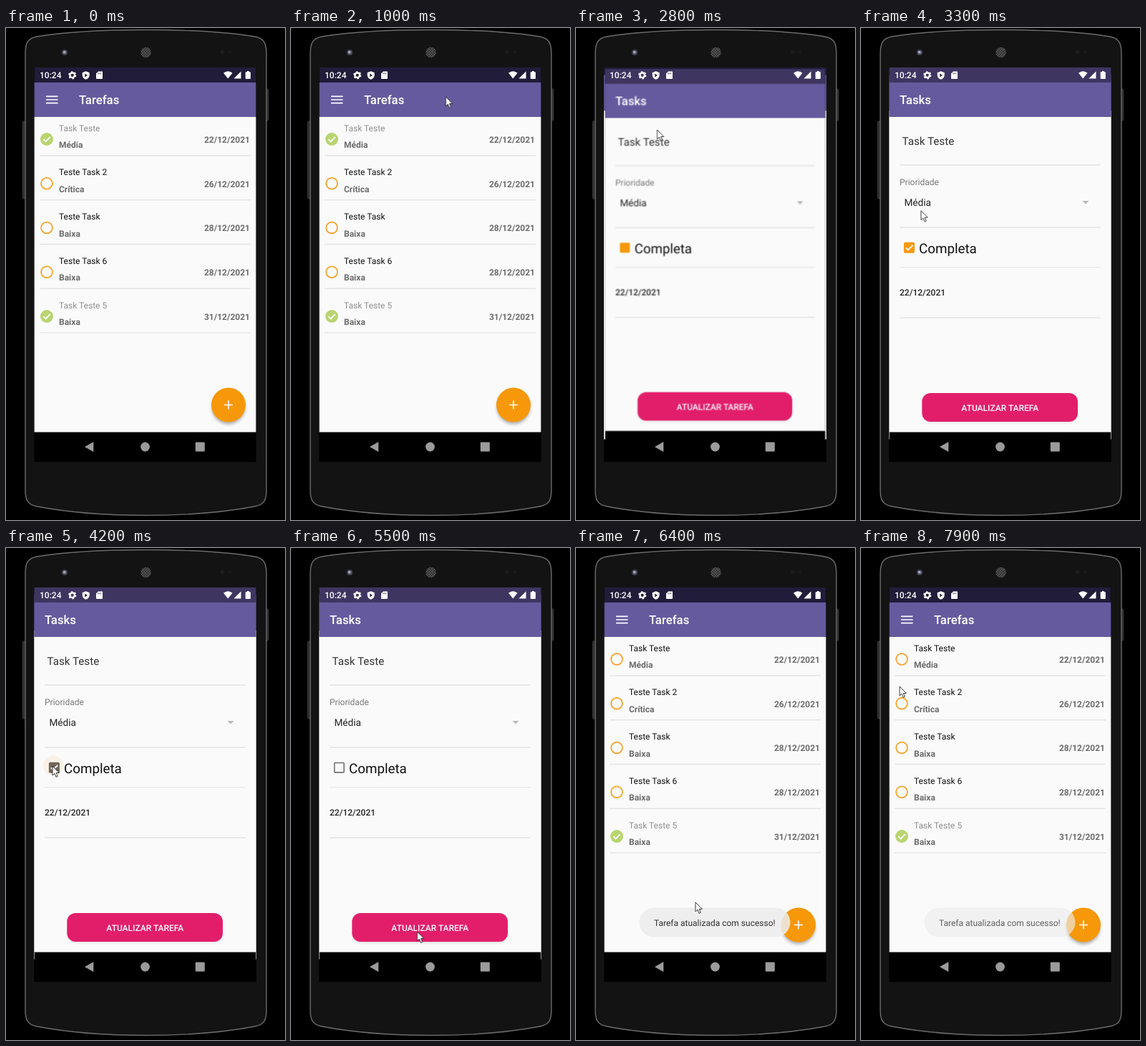
Animation of 390 by 686 pixels, one loop 8 s. Source, as an HTML page:

```html
<!DOCTYPE html>
<html lang="pt">
<head>
<meta charset="utf-8">
<title>Tarefas</title>
<style>
  html, body { margin: 0; width: 100%; height: 100%; overflow: hidden; background: #000; }
  svg { display: block; width: 390px; height: 686px; font: 12px Roboto, Arial, sans-serif; text-rendering: geometricPrecision; }
  .medium { font-weight: 500; }
  .bold { font-weight: 700; }
  .title { font-size: 16.8px; font-weight: 500; fill: #fff; }
  .line { stroke: #e4e4e4; stroke-width: 1.7; }

  .anim { animation: 8s step-end -30ms infinite; }
  #list, #task { transform-origin: 194.5px 330px; }
  #list { animation-name: list; }
  #task { animation-name: task; }
  #before { animation-name: before; }
  #after { animation-name: after; }
  #box { animation-name: box; }
  #tick { animation-name: tick; }
  #ripple { animation-name: ripple; }
  #press { animation-name: press; }
  #toast { animation-name: toast; }
  #cursor { animation-name: cursor; }

  @keyframes list {
    0% { transform: none; }
    33.75% { transform: scale(1.02); }
    35% { transform: scale(1.043); }
    72.5% { transform: scale(1.06); }
    73.75% { transform: scale(1.02); }
    75%, 100% { transform: none; }
  }
  @keyframes task {
    0% { opacity: 0; transform: scale(.94); }
    33.75% { opacity: .6; transform: scale(.96); }
    35% { opacity: 1; transform: scale(.993); }
    36.25% { opacity: 1; transform: none; }
    73.75% { opacity: .5; transform: scale(.95); }
    75%, 100% { opacity: 0; transform: scale(.9); }
  }
  @keyframes before { 0% { opacity: 1; } 62.5%, 100% { opacity: 0; } }
  @keyframes after { 0% { opacity: 0; } 62.5%, 100% { opacity: 1; } }
  @keyframes box {
    0% { fill: #f7980a; stroke: #f7980a; stroke-width: .5; }
    36.25% { fill: #f7980a; stroke: #f7980a; stroke-width: 1.6; }
    52.5% { fill: #716659; stroke: #716659; stroke-width: 1.6; }
    53.75%, 100% { fill: #fafafa; stroke: #707070; stroke-width: 1.6; }
  }
  @keyframes tick { 0% { opacity: 0; } 36.25% { opacity: 1; } 53.75%, 100% { opacity: 0; } }
  @keyframes ripple {
    0% { opacity: 0; }
    47.5% { opacity: .06; }
    48.75% { opacity: .1; }
    50% { opacity: .13; }
    52.5% { opacity: .08; }
    53.75% { opacity: .04; }
    55%, 100% { opacity: 0; }
  }
  @keyframes press { 0% { opacity: .1; } 67.5% { opacity: .16; } 75%, 100% { opacity: .1; } }
  @keyframes toast {
    0% { opacity: 0; }
    76.25% { opacity: .2; }
    77.5% { opacity: .45; }
    78.75% { opacity: .7; }
    80% { opacity: .86; }
    97.5% { opacity: .78; }
    98.75%, 100% { opacity: .66; }
  }
  @keyframes cursor {
    0% { opacity: 0; transform: translate(400px, 70px); }
    1.25% { opacity: 1; transform: translate(357px, 60px); animation-timing-function: steps(3); }
    5% { transform: translate(323px, 17px); }
    6.25% { transform: translate(323px, 17px); animation-timing-function: steps(9); }
    17.5% { transform: translate(131px, 159px); animation-timing-function: steps(3); }
    21.25% { transform: translate(118px, 135px); animation-timing-function: steps(3); }
    25% { transform: translate(113.5px, 142px); }
    36.25% { transform: translate(113.5px, 142px); animation-timing-function: steps(6); }
    43.75% { transform: translate(69px, 311px); }
    45% { transform: translate(65px, 304px); }
    53.75% { transform: translate(65px, 304px); animation-timing-function: steps(3); }
    57.5% { transform: translate(135px, 445px); animation-timing-function: steps(4); }
    62.5% { transform: translate(176.5px, 535px); }
    75% { transform: translate(176.5px, 535px); animation-timing-function: steps(4); }
    80% { transform: translate(167px, 494px); animation-timing-function: steps(2); }
    82.5% { transform: translate(160px, 470px); animation-timing-function: steps(9); }
    93.75% { transform: translate(53px, 150px); }
    96.25% { transform: translate(53px, 150px); animation-timing-function: steps(2); }
    98.75%, 100% { opacity: 1; transform: translate(54px, 193px); }
  }
</style>
</head>
<body>
<svg viewBox="0 0 390 686">
  <defs>
    <clipPath id="screen"><rect x="39.6" y="55" width="309.8" height="550"/></clipPath>
    <pattern id="mesh" width="2.6" height="2.6" patternUnits="userSpaceOnUse" patternTransform="rotate(45)">
      <rect width="2.6" height="2.6" fill="#262626"/><circle cx="1.3" cy="1.3" r=".8" fill="#808080"/>
    </pattern>
    <filter id="soft" x="-30%" y="-30%" width="160%" height="160%"><feGaussianBlur stdDeviation="2"/></filter>
    <path id="check" d="M-4.6 .2L-1.5 3.3L4.8 -3.2" fill="none" stroke="#fff" stroke-width="1.9"/>
    <g id="window">
      <rect x="39.6" y="55" width="309.8" height="550"/>
      <rect x="39.6" y="124" width="309.8" height="439.5" fill="#fafafa"/>
      <rect x="39.6" y="76" width="309.8" height="48" fill="#655a9e"/>
    </g>
  </defs>

  <!-- Phone -->
  <g>
    <rect width="390" height="686"/>
    <rect x="23.5" y="130" width="5" height="108" rx="1.5" fill="#2a2a2a" stroke="#505050" stroke-width=".8"/>
    <rect x="362" y="85" width="4.7" height="44" rx="1.5" fill="#2a2a2a" stroke="#505050" stroke-width=".8"/>
    <path d="M27 36C27 20 31 14.5 43 12C90 4.5 140 2.5 195.5 2.5S301 4.5 348 12C360 14.5 364 20 364 36V645C364 659 360 664.5 348 667C301 676 251 679.5 195.5 679.5S90 676 43 667C31 664.5 27 659 27 645Z" fill="#131313" stroke="#6c6c6c" stroke-width="1.4"/>
    <circle cx="82" cy="34" r="4.6" fill="#303138"/>
    <circle cx="82" cy="34" r="2.8" fill="#6a6c84"/>
    <circle cx="81.5" cy="33.5" r="1.4" fill="#b4b6c6"/>
    <circle cx="195.5" cy="34" r="7.3" fill="url(#mesh)"/>
    <circle cx="302.5" cy="33.5" r="3" fill="#1c1c1c"/>
    <circle cx="313" cy="33.5" r="2" fill="#1b1b1b"/>
  </g>

  <g clip-path="url(#screen)">
    <rect x="39" y="55" width="311" height="550"/>

    <g id="list" class="anim">
      <use href="#window"/>
      <rect x="39.6" y="55" width="309.8" height="21" fill="#211c39"/>
      <path d="M56 95.3h16.5M56 100h16.5M56 104.7h16.5" stroke="#fff" stroke-width="1.7"/>
      <text class="title" x="102" y="106">Tarefas</text>
      <g id="rows"></g>
      <circle cx="311" cy="529" r="23.5" opacity=".3" filter="url(#soft)"/>
      <circle cx="311" cy="525.5" r="24" fill="#f7980a"/>
      <path d="M305 525.5h12M311 519.5v12" stroke="#fff" stroke-width="1.7"/>
    </g>

    <g id="task" class="anim">
      <use href="#window"/>
      <rect x="39.6" y="55" width="309.8" height="21" fill="#3e3661"/>
      <text class="title" x="54" y="106">Tasks</text>
      <path class="line" d="M54 191H335M54 278H335M54 404H335"/>
      <path class="line" d="M54 333.8H335" style="stroke-width: 1"/>
      <text x="57.5" y="163" font-size="15.2" fill="#333">Task Teste</text>
      <text x="54" y="218.5" fill="#777">Prioridade</text>
      <text x="60.5" y="248" font-size="13.6" fill="#222">Média</text>
      <path d="M309.5 241h9l-4.5 4.5z" fill="#b8b8b8"/>
      <circle id="ripple" class="anim" cx="66" cy="303.5" r="14" fill="#f7980a"/>
      <rect id="box" class="anim" x="60.7" y="299.5" width="13.4" height="13.4" rx="1"/>
      <g id="tick" class="anim"><use href="#check" x="67.4" y="306.2"/></g>
      <text x="81" y="314" font-size="18.8" fill="#111">Completa</text>
      <text class="medium" x="54" y="373.3" fill="#222">22/12/2021</text>
      <rect id="press" class="anim" x="87" y="513" width="215" height="37" rx="12" filter="url(#soft)"/>
      <rect x="85.3" y="509" width="217.7" height="40" rx="12" fill="#e21e6a"/>
      <text class="medium" x="194.3" y="533.7" text-anchor="middle" fill="#fff">ATUALIZAR TAREFA</text>
    </g>

    <!-- System bars -->
    <g fill="#fff">
      <text class="medium" x="47" y="70">10:24</text>
      <circle cx="92.7" cy="65.8" r="3.3" fill="none" stroke="#fff" stroke-width="2.4"/>
      <circle cx="92.7" cy="65.8" r="4.8" fill="none" stroke="#fff" stroke-width="1.6" stroke-dasharray="2.5 2.53"/>
      <path d="M111.7 60.2L116.7 62.2V65.8C116.7 68.8 114.5 71 111.7 71.8C108.9 71 106.7 68.8 106.7 65.8V62.2Z"/>
      <path d="M110.2 63.4v5l3.8-2.5z" fill="#2c2649"/>
      <path d="M129 60.5h5.2q.8 0 .8.8v9q0 .8-.8.8h-7.4q-.8 0-.8-.8v-6.8z"/>
      <path d="M128.8 62.5v1.8M130.7 62.5v1.8M132.6 62.5v1.8" stroke="#2c2649" stroke-width=".9"/>
      <path d="M304 62.8Q310.3 57.8 316.6 62.8L310.3 70.6Z"/>
      <path d="M328.5 60.5V70.6H318.4Z"/>
      <path d="M337 60h2.6v1.2h1.6q.7 0 .7.7v8.3q0 .7-.7.7h-5.8q-.7 0-.7-.7v-8.3q0-.7.7-.7h1.6z"/>
    </g>
    <g fill="#9b9b9b">
      <path d="M110 584L122.3 577V591Z"/>
      <circle cx="194.5" cy="584" r="6.4"/>
      <rect x="264.8" y="577.5" width="13" height="13" rx="1"/>
    </g>

    <g id="toast" class="anim">
      <rect x="88.5" y="501.5" width="211" height="41" rx="20.5" fill="#ededed"/>
      <text x="109" y="526.7" fill="#111">Tarefa atualizada com sucesso!</text>
    </g>
  </g>

  <g id="cursor" class="anim">
    <path d="M0 0V13L3 10.3L5.1 15.4L7.3 14.4L5.2 9.5H9.3Z" fill="#fff" stroke="#222" stroke-width=".9"/>
  </g>
</svg>
<script>
  const tasks = [
    ["Task Teste", "Média", 22, true],
    ["Teste Task 2", "Crítica", 26, false],
    ["Teste Task", "Baixa", 28, false],
    ["Teste Task 6", "Baixa", 28, false],
    ["Task Teste 5", "Baixa", 31, true]
  ];

  function head(name, done) {
    const icon = done
      ? '<circle cx="57" cy="155" r="9" fill="#b8d56f"/><use href="#check" x="57" y="155"/>'
      : '<circle cx="57" cy="155" r="7.9" fill="none" stroke="#f8a024" stroke-width="1.7"/>';
    return `${icon}<text x="74" y="143.7" fill="${done ? "#8f8f8f" : "#111"}">${name}</text>`;
  }

  function row([name, priority, day, done], i) {
    const top = i
      ? head(name, done)
      : `<g id="before" class="anim">${head(name, true)}</g><g id="after" class="anim">${head(name, false)}</g>`;
    return `<g transform="translate(0 ${i * 61.75})">${top}
      <g class="bold" fill="#6c6c6c"><text x="74" y="167">${priority}</text>
      <text x="341" y="159.8" text-anchor="end">${day}/12/2021</text></g>
      <path class="line" d="M47 178H342"/></g>`;
  }

  document.getElementById("rows").innerHTML = tasks.map(row).join("");
</script>
</body>
</html>
```
